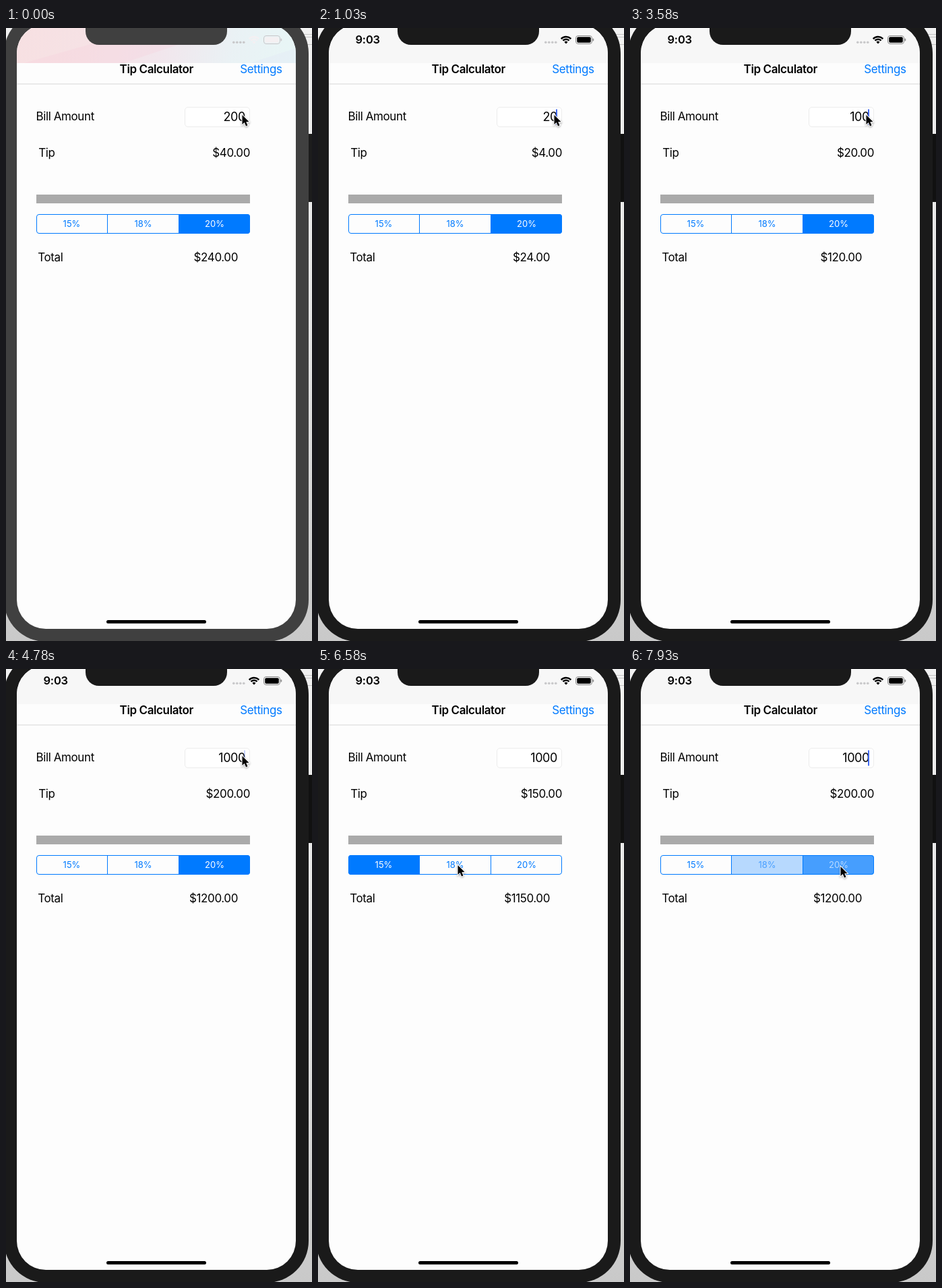
Animation, 454 px wide and 909 px high, one loop 8 s. Source, as an HTML page with a canvas:

```html
<!DOCTYPE html>
<html lang="en">
<head>
<meta charset="utf-8">
<title>Tip Calculator</title>
<style>
html, body { margin: 0; width: 100%; height: 100%; overflow: hidden; background: #e4e4e4; }
canvas { display: block; width: 454px; height: 909px; }
</style>
</head>
<body>
<canvas id="stage"></canvas>
<script>
const W = 454, H = 909, LOOP = 8000, STEP = 150, FIRST = 130;
const BLUE = '#007aff';
const canvas = document.getElementById('stage');
const ctx = canvas.getContext('2d');
const scale = window.devicePixelRatio || 1;
canvas.width = W * scale;
canvas.height = H * scale;

const typed = [[0, '200'], [1030, '20'], [1330, '2'], [1480, ''], [2530, '1'],
  [3430, '10'], [3580, '100'], [3730, '1000']];
const picks = [[-1000, 2], [5680, 0], [6730, 1], [7930, 2]];
const presses = [[5530, 0], [7780, 2]];
const rates = [15, 18, 20];
const path = [[4780, 350, 129], [5530, 97, 291], [5830, 97, 291],
  [6580, 207, 291], [6730, 207, 291], [7780, 312, 293]];

const lastIndex = (list, t) => list.findLastIndex(e => e[0] <= t);

function rounded(x, y, w, h, r) {
  ctx.beginPath();
  ctx.roundRect(x, y, w, h, r);
}

function fillRound(x, y, w, h, r, color) {
  ctx.fillStyle = color;
  rounded(x, y, w, h, r);
  ctx.fill();
}

function rect(x, y, w, h, color) {
  ctx.fillStyle = color;
  ctx.fillRect(x, y, w, h);
}

function polygon(points, color) {
  ctx.fillStyle = color;
  ctx.beginPath();
  points.forEach(([x, y]) => ctx.lineTo(x, y));
  ctx.closePath();
  ctx.fill();
}

function text(str, x, y, { size = 17, weight = 400, color = '#000', align = 'left', track = -0.4 } = {}) {
  ctx.font = `${weight} ${size}px Inter, Roboto, sans-serif`;
  ctx.letterSpacing = track + 'px';
  ctx.textAlign = align;
  ctx.fillStyle = color;
  ctx.fillText(str, x, y);
}

function linear(x0, y0, x1, y1, ...colors) {
  const g = ctx.createLinearGradient(x0, y0, x1, y1);
  colors.forEach((c, i) => g.addColorStop(i / (colors.length - 1), c));
  return g;
}

function caretAlpha(t) {
  const key = lastIndex(typed, t);
  const start = key === 0 ? 200 : typed[key][0] + 80;
  if (key > 0 && t < start) return 1;
  const p = ((t - start) % 1000 + 1000) % 1000;
  if (p < 500) return 1;
  if (p < 650) return 0.4;
  return p < 850 ? 0 : 0.3;
}

function pointer(t) {
  const i = lastIndex(path, t);
  if (i < 0) return path[0].slice(1);
  if (i === path.length - 1) return path[i].slice(1);
  const [t0, x0, y0] = path[i], [t1, x1, y1] = path[i + 1];
  const u = (t - t0) / (t1 - t0), e = u * u * (3 - 2 * u);
  return [x0 + (x1 - x0) * e, y0 + (y1 - y0) * e];
}

function segmentLevels(t) {
  const i = lastIndex(picks, t), levels = [0, 0, 0];
  const u = t - picks[i][0] < STEP ? 0.72 : 1;
  if (i > 0) levels[picks[i - 1][1]] = 1 - u;
  levels[picks[i][1]] = u;
  for (const [at, n] of presses) if (t >= at && t < at + STEP) levels[n] = 0.2;
  return levels;
}

function drawPhone(phase) {
  rect(0, 0, W, H, linear(0, 0, 0, H, '#f1f1f1', '#e4e4e4', '#c9c9c9'));
  for (const y of [9, 13, 24]) rect(440, y, 14, 1, '#c4c4c4');
  fillRound(446, 157, 12, 101, 3, phase ? '#111' : '#1c1c1c');
  fillRound(-3, -24.5, 452, 934.5, 62, phase ? '#1a1a1a' : '#404040');
}

function drawWallpaper(height, alpha) {
  ctx.save();
  ctx.beginPath();
  ctx.rect(16, -6, 414, height + 6);
  ctx.clip();
  ctx.globalAlpha = alpha;
  rect(16, -6, 414, height + 6, linear(16, 20, 430, 110, '#f7c9cd', '#f5cdd3', '#ecd5e2', '#dcecf2', '#d8f6f5'));
  polygon([[16, 100], [150, 60], [330, 0], [210, 0], [16, 55]], 'rgba(246,205,218,.6)');
  polygon([[190, 129], [300, 72], [430, 30], [430, 75], [300, 129]], 'rgba(222,226,245,.55)');
  polygon([[285, 129], [370, 86], [430, 70], [430, 129]], 'rgba(218,248,246,.7)');
  ctx.restore();
}

function drawStatus(phase) {
  const ink = ['#f4f0f2', '#2b0d1b', '#000', '#000'][phase];
  const edge = phase ? '#888' : '#c9c6c9';
  if (phase > 1) text('9:03', 55.5, 23, { size: 16.5, weight: 600, track: -0.2 });
  for (let i = 0; i < 4; i++) fillRound(336 + i * 5, 19.5, 3.6, 3.6, 1.8, phase === 1 ? '#c5b9c3' : '#c8c8ca');

  ctx.strokeStyle = ink;
  ctx.lineWidth = 2.4;
  for (const r of [6.3, 10]) {
    ctx.beginPath();
    ctx.arc(368, 23, r, -Math.PI * 0.76, -Math.PI * 0.24);
    ctx.stroke();
  }
  ctx.fillStyle = ink;
  ctx.beginPath();
  ctx.moveTo(368, 23.5);
  ctx.arc(368, 23, 3.4, -Math.PI * 0.77, -Math.PI * 0.23);
  ctx.fill();

  ctx.strokeStyle = edge;
  ctx.lineWidth = 1;
  rounded(382.5, 11.5, 24, 12, 3.5);
  ctx.stroke();
  fillRound(384.2, 13.2, 20.6, 8.6, 2, ink);
  fillRound(407.6, 15.5, 1.6, 4, 1, edge);
}

function drawCamera() {
  ctx.fillStyle = 'rgba(199,188,202,.94)';
  ctx.beginPath();
  ctx.arc(351, 47, 25, 0, 7);
  ctx.fill();
  const pale = '#e5dfe7';
  fillRound(340, 40, 22, 15, 2.5, pale);
  polygon([[345, 41], [347.5, 37.5], [354.5, 37.5], [357, 41]], pale);
  ctx.strokeStyle = '#c3b8c6';
  ctx.lineWidth = 1.4;
  ctx.beginPath();
  ctx.arc(351, 47, 4.4, 0, 7);
  ctx.stroke();
}

function drawSegments(levels) {
  ctx.save();
  rounded(45, 276, 317, 29, 4);
  ctx.clip();
  levels.forEach((a, i) => rect(45 + i * 105.8, 276, 105.8, 29, `rgba(0,122,255,${a})`));
  ctx.restore();
  ctx.strokeStyle = BLUE;
  ctx.lineWidth = 1;
  rounded(45.5, 276.5, 316, 28, 3.5);
  ctx.stroke();
  rect(150, 276, 1, 29, BLUE);
  rect(256, 276, 1, 29, BLUE);
  levels.forEach((a, i) => {
    const color = `rgb(${255 * a},${122 + 133 * a},255)`;
    text(rates[i] + '%', 97.5 + i * 106, 295.2, { size: 13, color, align: 'center', track: 0 });
  });
}

function drawPointer([x, y]) {
  const shape = [[0, 0], [0, 14], [3.2, 11.1], [5.6, 16.4], [8, 15.3], [5.7, 10.2], [10, 10]];
  ctx.save();
  ctx.translate(x + 0.5, y);
  ctx.beginPath();
  shape.forEach(([px, py]) => ctx.lineTo(px, py));
  ctx.closePath();
  ctx.shadowColor = 'rgba(0,0,0,.35)';
  ctx.shadowBlur = 3 * scale;
  ctx.shadowOffsetY = scale;
  ctx.strokeStyle = '#fff';
  ctx.lineWidth = 2;
  ctx.stroke();
  ctx.shadowColor = 'transparent';
  ctx.fillStyle = '#000';
  ctx.fill();
  ctx.restore();
}

function drawScreen(t, phase) {
  ctx.save();
  rounded(16, -5.5, 414, 896.5, 43);
  ctx.clip();
  rect(16, -6, 414, 898, '#fdfdfd');
  rect(16, -6, 414, 58, '#f7f7f7');
  if (phase === 0) drawWallpaper(52, 0.5);
  if (phase === 1) drawWallpaper(129.5, 1);
  if (phase === 2) drawWallpaper(52, 0.15);
  rect(16, 82.5, 414, 1, phase === 1 ? 'rgba(170,140,155,.35)' : '#d8d8d8');
  drawStatus(phase);

  text('Tip Calculator', 223.2, 67, { weight: 600, align: 'center', color: phase === 1 ? '#26101a' : '#000' });
  text('Settings', 409.5, 67, { color: BLUE, align: 'right' });
  if (phase === 1) drawCamera();

  text('Bill Amount', 44.5, 137);
  text('Tip', 48.2, 191);
  text('Total', 47.2, 346);

  const amount = typed[lastIndex(typed, t)][1];
  const rate = rates[picks[lastIndex(picks, t)][1]];
  const tip = amount * rate / 100;
  if (phase !== 1) fillRound(265, 117, 97, 30, 5, '#fff');
  ctx.strokeStyle = phase === 1 ? 'rgba(190,205,210,.3)' : '#ececec';
  ctx.lineWidth = 1;
  rounded(265.5, 117.5, 96, 29, 4.5);
  ctx.stroke();
  text(amount, 355, 138, { size: 18, align: 'right' });
  rect(353, 120.5, 2, 23, `rgba(66,107,242,${caretAlpha(t)})`);
  text('$' + tip.toFixed(2), 362, 191, { align: 'right' });
  text('$' + (+amount + tip).toFixed(2), 344, 346, { align: 'right' });

  rect(45, 247, 317, 13, '#aaa');
  drawSegments(segmentLevels(t));
  fillRound(149, 878, 148, 5, 2.5, '#000');
  ctx.restore();
}

function drawNotch(phase) {
  fillRound(118, -20, 210, 45, 20, phase ? '#1a1a1a' : '#404040');
}

function render(now) {
  const raw = now % LOOP;
  const t = raw < FIRST ? 0 : FIRST + Math.floor((raw - FIRST) / STEP) * STEP;
  const phase = [130, 280, 430].filter(at => t >= at).length;
  ctx.setTransform(scale, 0, 0, scale, 0, 0);
  drawPhone(phase);
  drawScreen(t, phase);
  drawNotch(phase);
  drawPointer(pointer(t));
}

const begin = performance.now();
function tick() {
  render(performance.now() - begin);
  requestAnimationFrame(tick);
}
tick();
</script>
</body>
</html>
```
